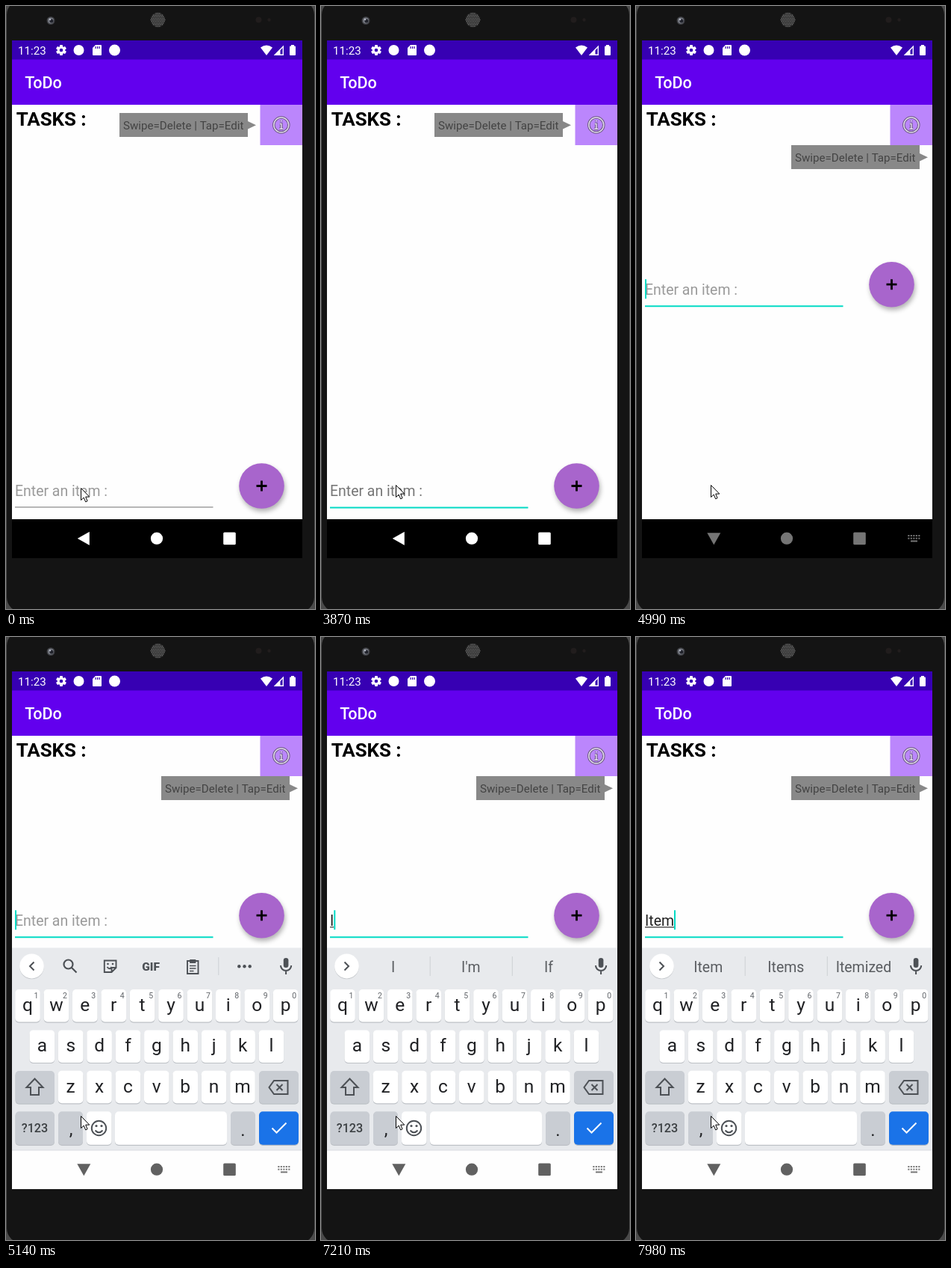
Write an HTML page with a canvas that moves like this. It is 414 by 806 pixels and loops after 8 s.

```html
<!DOCTYPE html>
<html lang="en">
<head>
<meta charset="utf-8">
<title>ToDo</title>
<style>
html, body { margin: 0; width: 100%; height: 100%; overflow: hidden; background: #141414; }
canvas { display: block; width: 414px; height: 806px; }
</style>
</head>
<body>
<canvas id="stage"></canvas>
<script>
const LOOP = 8000;
const TEAL = '#03dac5', ICON = '#4d5156';
const canvas = document.getElementById('stage');
const ratio = window.devicePixelRatio || 1;
canvas.width = 414 * ratio;
canvas.height = 806 * ratio;
const c = canvas.getContext('2d');
let time = 0;

// Value of the latest [start, value] step that has begun.
const step = (...steps) => steps.filter(s => s[0] <= time).pop()[1];

function rect(x, y, w, h, color, radius = 0) {
  c.fillStyle = color;
  c.beginPath();
  c.roundRect(x, y, w, h, radius);
  c.fill();
}
function circle(x, y, r, color) {
  c.fillStyle = color;
  c.beginPath();
  c.arc(x, y, r, 0, Math.PI * 2);
  c.fill();
}
function fill(d, color) {
  c.fillStyle = color;
  c.fill(new Path2D(d));
}
function stroke(d, color, width = 2) {
  c.strokeStyle = color;
  c.lineWidth = width;
  c.stroke(new Path2D(d));
}
function text(s, x, y, size, color, weight = 400, align = 'left') {
  c.font = `${weight} ${size}px Roboto, sans-serif`;
  c.textAlign = align;
  c.fillStyle = color;
  c.fillText(s, x, y);
}
function moved(x, y, draw) {
  c.save();
  c.translate(x, y);
  draw();
  c.restore();
}

function phone() {
  rect(0, 0, 414, 806, '#4a4a4a');
  rect(1, -8, 412, 818, '#141414', 20);
  circle(60, 19.5, 5.5, '#3a3b3f');
  circle(60, 19.5, 4, '#74777f');
  circle(61, 20, 2.5, '#22242c');
  circle(59, 18, 1.2, '#b4b8c4');
  circle(203.5, 18.5, 10, '#2b2b2b');
  for (let row = -4; row <= 4; row++)
    for (let col = -4; col <= 4; col++) {
      const x = col * 2.3 + (row % 2 ? 1.15 : 0), y = row * 2.1;
      if (Math.hypot(x, y) < 9.5) circle(203.5 + x, 18.5 + y, 0.75, '#777');
    }
  circle(338.5, 18.5, 4, '#211d1d');
  circle(352.5, 18.5, 2.2, '#211d1d');
}

function statusBar() {
  rect(8, 46, 389, 26, '#3700b3');
  text('11:23', 16, 64.5, 15.13, '#fff');
  moved(74, 59, () => {
    for (let i = 0; i < 6; i++) {
      c.rotate(Math.PI / 3);
      rect(-2, -7, 4, 5, '#fff', 1);
    }
    circle(0, 0, 5.2, '#fff');
    circle(0, 0, 2.3, '#3700b3');
  });
  circle(97.5, 59, 7, '#fff');
  fill('M120 52h7q1 0 1 1v12q0 1-1 1h-10q-1 0-1-1v-9z', '#fff');
  for (const x of [119.5, 122, 124.5]) rect(x, 54, 1.2, 3, '#3700b3');
  if (time < 7460) circle(145.5, 59, 7.5, '#fff');
  fill('M349 66L341 55.5Q349 49.5 357 55.5Z', '#fff');
  stroke('M360.5 65.3H371.3V54.3Z', '#fff', 1.4);
  fill('M359 66L367.5 57.5V66Z', '#fff');
  rect(380, 53.5, 8, 12.5, '#fff', 1);
  rect(382, 52, 4, 2, '#fff');
}

function infoIcon() {
  const ring = 'M358.8 159a10 10 0 1 0 20 0a10 10 0 1 0-20 0';
  const letter = 'M368.8 153v1.2M366.8 157.5h2v6.5M366.3 164.2h5';
  for (const d of [ring, letter]) {
    stroke(d, '#6d5c83', 3.6);
    stroke(d, '#e2d8ee', 1.5);
  }
}

function tooltip() {
  rect(152, 143, 172, 32, '#888');
  fill('M324 154L335 159.3L324 164.5Z', '#888');
  text('Swipe=Delete | Tap=Edit', 157, 165, 15.13, '#434343');
}

function inputRow() {
  const focused = time >= 3870;
  const typed = step([0, ''], [5980, 'I'], [7330, 'It'], [7730, 'Item']);
  const marked = step([0, ''], [6250, 'I'], [7460, 'It'], [7730, 'Ite'], [7980, 'Item']);
  const hint = step([0, '#9a9a9a'], [3870, '#757575'], [3990, '#9a9a9a']);
  const caret = step([0, 0], [3990, 1], [4480, 0], [4870, 1], [5420, 0], [5850, 1], [6710, 0], [7210, 1]);

  text(typed || 'Enter an item :', 12, 655, 19.45, typed ? '#212121' : hint);
  const end = 12 + (typed ? c.measureText(typed).width : 0);
  if (marked) rect(12, 656.5, c.measureText(marked).width, 1.2, '#333');
  if (caret) rect(end, 634.5, 2, 26, TEAL);
  if (focused) rect(12, 669.5, 265.5, 2.1, TEAL);
  else rect(12, 669.3, 265.5, 1.1, '#8c8c8c');

  c.save();
  c.shadowColor = 'rgba(0,0,0,.3)';
  c.shadowBlur = 6 * ratio;
  c.shadowOffsetX = 1.5 * ratio;
  c.shadowOffsetY = 4 * ratio;
  circle(342.5, 641.5, 30.3, '#a865cc');
  c.restore();
  stroke('M335.5 641.5h14M342.5 634.5v14', '#000', 2.8);
}

function key(x, y, w, color = '#fff', h = 43.5) {
  rect(x, y + 1.2, w, h, '#bdc1c6', 5);
  rect(x, y, w, h, color, 5);
}

function letterKeys() {
  const upper = time >= 5850 && time < 6100;
  const rows = [['qwertyuiop', 29], ['asdfghjkl', 48.3], ['zxcvbnm', 86.6]];
  rows.forEach(([letters, left], row) => {
    const y = 471 + row * 54.4;
    [...letters].forEach((letter, i) => {
      const x = left + i * 38.4;
      key(x - 16.8, y, 33.6);
      text(upper ? letter.toUpperCase() : letter, x, y + 29, 24.5, '#202124', 400, 'center');
      if (row === 0) text((i + 1) % 10, x + 11.5, y + 11.5, 10.5, '#5f6368', 400, 'center');
    });
  });
  const arrow = 'M38.5 590.5L27.5 602H33V612H44V602H49.5Z';
  key(12.5, 580, 52.5, '#c9cdd3');
  if (upper) fill(arrow, ICON);
  stroke(arrow, ICON);
  key(339, 580, 53, '#c9cdd3');
  stroke('M359 593H377.5V611H359L352.5 602ZM362.5 598l8 8m0-8l-8 8', ICON);
}

function bottomKeys() {
  const y = 634.3, h = 44.5;
  key(12.5, y, 52.5, '#c9cdd3', h);
  text('?123', 38.5, 662, 16.2, '#3c4043', 500, 'center');
  key(70, y, 33, '#c9cdd3', h);
  text(',', 87, 666, 24, '#202124', 400, 'center');
  key(108, y, 33.5, '#fff', h);
  stroke('M114.8 656.5a9.7 9.7 0 1 0 19.4 0a9.7 9.7 0 1 0-19.4 0M119.5 659.5q5 5.5 10 0', ICON);
  circle(121, 653.5, 1.6, ICON);
  circle(128, 653.5, 1.6, ICON);
  key(146, y, 150, '#fff', h);
  key(301, y, 33, '#c9cdd3', h);
  text('.', 317.5, 667, 24, '#202124', 400, 'center');
  key(339, y, 53, '#1a73e8', h);
  stroke('M356.5 656.5L362.5 662.5L375.5 649.5', '#fff');
}

function toolbar() {
  const suggesting = time >= 6400;
  circle(34.5, 440.8, 16.4, '#c4c7cb');
  circle(34.5, 440, 16.4, '#fff');
  stroke(suggesting ? 'M31.5 434.5l5.5 5.5l-5.5 5.5' : 'M37.5 434.5l-5.5 5.5l5.5 5.5', ICON);
  rect(371.8, 429, 6.6, 13, ICON, 3.3);
  stroke('M368 439a7.1 7.1 0 0 0 14.2 0M375.1 446v5', ICON);

  if (suggesting) {
    const words = step(
      [0, ['I', "I'm", 'If']],
      [7580, ['It', "It's", 'If']],
      [7730, ['Ite', 'Item', 'Items']],
      [7980, ['Item', 'Items', 'Itemized']]);
    words.forEach((word, i) => text(word, 96.7 + i * 104.1, 447.5, 19.45, '#5a5d61', 400, 'center'));
    rect(145.7, 427, 1, 26, '#cdd0d4');
    rect(255.8, 427, 1, 26, '#cdd0d4');
    return;
  }
  stroke('M77.5 437.5a6 6 0 1 0 12 0a6 6 0 1 0-12 0M88 442l6.5 6.5', ICON, 2.2);
  stroke('M133.5 432.5H147.5V442L141.5 448H131.8V432.5H134M147.5 442H141.5V448M135.5 441q3.5 4.5 6 0', ICON, 1.9);
  circle(136.5, 437, 1.3, ICON);
  circle(143, 437, 1.3, ICON);
  text('GIF', 194, 445.5, 15.5, ICON, 900, 'center');
  stroke('M243 433H257.5V450H243Z', ICON, 1.9);
  rect(246, 431, 8.5, 5, ICON, 1);
  stroke('M246 439.5h8.5M246 443h8.5M246 446.4h5.5', ICON, 1.5);
  rect(284.3, 428, 1, 24, '#cdd0d4');
  for (const x of [312.3, 319.5, 326.7]) circle(x, 440.3, 2.2, ICON);
}

function keyboard() {
  rect(8, 415.5, 389, 270.5, '#e8eaed');
  toolbar();
  letterKeys();
  bottomKeys();
}

function navBar() {
  const light = time >= 5140;
  const color = step([0, '#fff'], [4750, '#c4c4c4'], [4870, '#989898'], [4990, '#757575'], [5140, '#616161']);
  const turn = step([0, 0], [4480, 30], [4600, 65], [4750, 90]);
  const keysAlpha = step([0, 0], [4110, 0.5], [4230, 1]);
  rect(8, 686, 389, 52, light ? '#fefefe' : '#000');
  if (light) rect(8, 685.5, 389, 1, '#dcdee1');
  moved(104.3, 711.7, () => {
    c.rotate(-turn * Math.PI / 180);
    fill('M-8.5 0L7.5-9V9Z', color);
  });
  circle(202, 711.7, 8.1, color);
  rect(291.2, 703.5, 16.6, 16.4, color, 1.5);
  c.globalAlpha = keysAlpha;
  const dots = light ? '#777' : color;
  for (let i = 0; i < 5; i++) {
    rect(364.3 + i * 3.5, 707, 2.1, 2, dots);
    rect(364.3 + i * 3.5, 710.6, 2.1, 2, dots);
  }
  rect(368, 714.3, 9, 2, dots);
  c.globalAlpha = 1;
}

function pointer() {
  moved(100.5, time < 940 ? 644.5 : 640.5, () => {
    const arrow = 'M0 0V16L3.7 12.6L6.2 18.3L8.6 17.2L6.2 11.6H11.3Z';
    fill(arrow, '#fff');
    stroke(arrow, '#000', 1);
  });
}

function draw() {
  time = performance.now() % LOOP;
  c.setTransform(ratio, 0, 0, ratio, 0, 0);
  const raised = time >= 4870;
  phone();
  rect(8, 132, 389, 554, '#fefefe');
  statusBar();
  rect(8, 71.5, 389, 60.5, '#6200ee');
  text('ToDo', 25.3, 110, 21.6, '#fff', 500);
  text('TASKS :', 13.7, 160, 25.9, '#000', 700);
  rect(340.5, 132, 56.5, 54, '#bb86fc');
  infoIcon();
  moved(raised ? 56 : 0, raised ? 43 : 0, tooltip);
  moved(0, raised ? -269.3 : 0, inputRow);
  if (time >= 5140) keyboard();
  navBar();
  pointer();
  requestAnimationFrame(draw);
}
draw();
</script>
</body>
</html>
```
